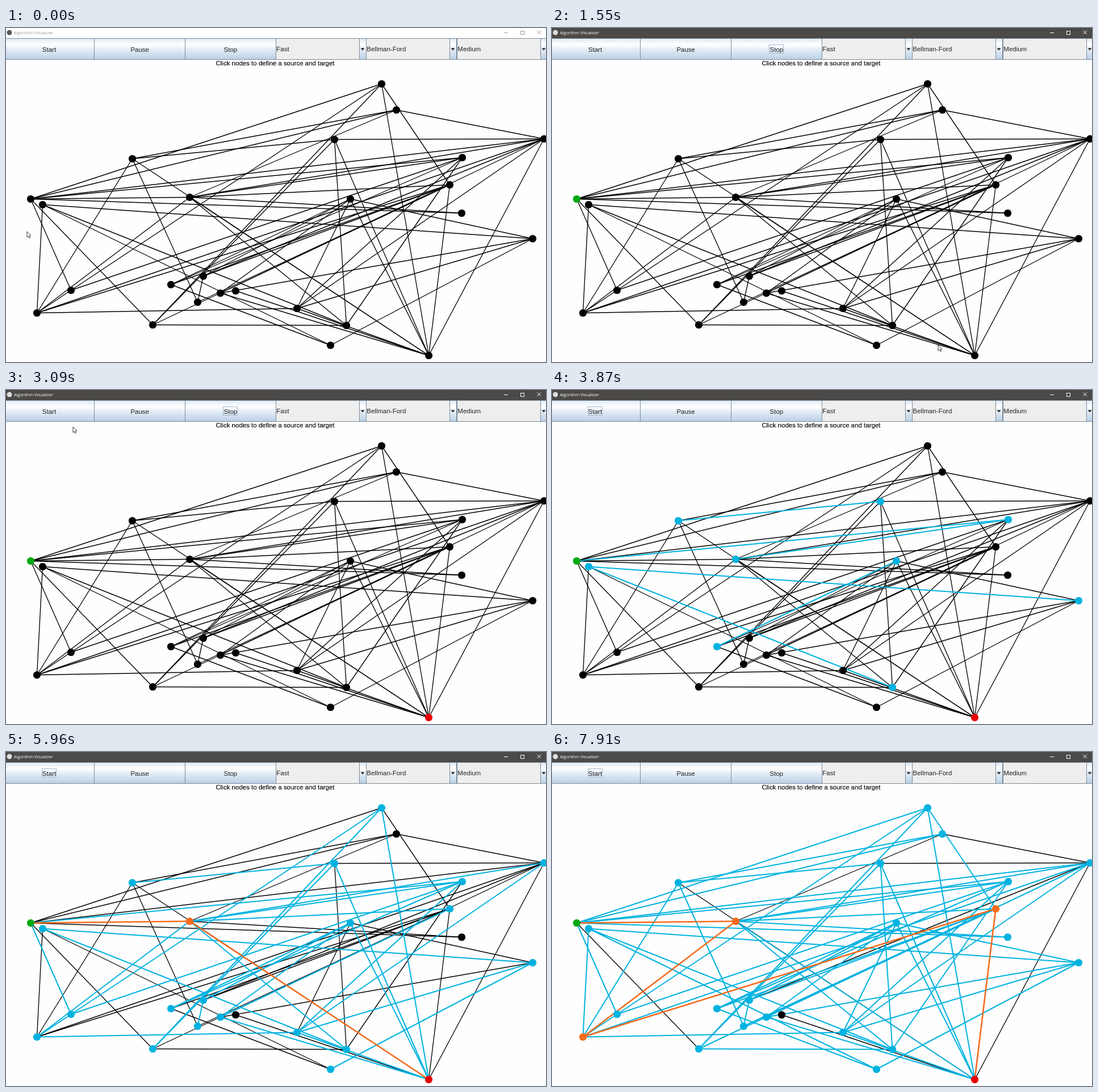
Animation of 951x589 px, one loop 7.99 s. Source, as an HTML page with a canvas:

```html
<!DOCTYPE html>
<html lang="en">
<head>
<meta charset="utf-8">
<title>Algorithm Visualizer</title>
<style>
  html, body { margin: 0; width: 100%; height: 100%; overflow: hidden; background: #fefefe; }
  canvas { display: block; }
</style>
</head>
<body>
<canvas id="stage" width="951" height="589"></canvas>
<script>
const ctx = document.getElementById('stage').getContext('2d');
const LOOP = 7990;
const ACTIVATE = 780, PICK_TARGET = 2410, PRESS = 3240, RELEASE = 3340;
const FIRST_PATH = 5360, BETTER_PATH = 6620;
const BLACK = '#000', BLUE = '#00b2e0', ORANGE = '#f76b1e', GREEN = '#00a814', RED = '#e80000';
const FONT = '11.5px "Liberation Sans", Arial, sans-serif';

const nodes = {
  a: [661, 98], b: [687, 144], c: [578, 196], d: [947, 195], e: [222, 230],
  f: [803, 228], g: [781, 276], h: [43, 301], i: [64, 311], j: [323, 298],
  k: [606, 301], l: [802, 326], m: [927, 371], n: [114, 462], o: [290, 452],
  p: [347, 437], q: [337, 483], r: [377, 467], s: [404, 463], t: [512, 494],
  u: [54, 502], v: [258, 523], w: [599, 524], x: [571, 559], y: [744, 577]
};

// Edges are node pairs, visited at even steps between start and end.
const visits = [
  [3420, 3940, 'im iw hf ec jf ok tf'],
  [4010, 4770, 'av cv cy tm ry dt ty jd pq rg jg'],
  [4830, 5580, 'hn nf hj au ay ju jw jy ky of pk'],
  [5650, 5900, 'xm ut rk'],
  [5990, 6410, 'ud eu eq ix ox vw hd'],
  [6500, 6600, 'ug gy'],
  [6850, 7290, 'jl hl bh be pg og dr'],
  [7380, 7900, 'ah ag iu km rm kt cw fw vg qg'],
  [Infinity, Infinity, 'ey jb bd cd dp dy hv sy']
];
const edges = visits.flatMap(([start, end, list]) => {
  const pairs = list.split(' ');
  return pairs.map((id, n) => ({
    id, time: start === Infinity ? start : start + (end - start) * n / (pairs.length - 1)
  }));
});

const cursorKeys = [
  [0, 37, 359], [40, 37, 359], [610, 42, 305], [ACTIVATE, 42, 305],
  [1550, 680, 559], [2260, 743, 574], [PICK_TARGET, 743, 574],
  [3090, 118, 65], [3200, 72, 39], [RELEASE, 72, 39], [3520, 30, -20]
];

function line(x1, y1, x2, y2, color, width) {
  ctx.strokeStyle = color;
  ctx.lineWidth = width;
  ctx.beginPath();
  ctx.moveTo(x1, y1);
  ctx.lineTo(x2, y2);
  ctx.stroke();
}

function polygon(points, fill) {
  ctx.beginPath();
  points.forEach(([x, y]) => ctx.lineTo(x, y));
  ctx.closePath();
  ctx.fillStyle = fill;
  ctx.fill();
}

function dot(x, y, radius, color) {
  ctx.fillStyle = color;
  ctx.beginPath();
  ctx.arc(x, y, radius, 0, Math.PI * 2);
  ctx.fill();
}

function text(label, x, y, align = 'left', color = '#222', font = FONT) {
  ctx.font = font;
  ctx.textAlign = align;
  ctx.fillStyle = color;
  ctx.fillText(label, x, y);
}

function metal(x, width) {
  const shade = ctx.createLinearGradient(0, 18, 0, 56);
  shade.addColorStop(0, '#dce8f3');
  shade.addColorStop(0.3, '#fff');
  shade.addColorStop(0.5, '#e6eef6');
  shade.addColorStop(1, '#b8cfe5');
  ctx.fillStyle = shade;
  ctx.fillRect(x, 18, width, 38);
}

function outline(x, y, width, height, color = '#7a8a99') {
  ctx.strokeStyle = color;
  ctx.lineWidth = 1;
  ctx.strokeRect(x + 0.5, y + 0.5, width, height);
}

function drawTitle(active) {
  const color = active ? '#fff' : '#999';
  ctx.fillStyle = active ? '#4c4a48' : '#fff';
  ctx.fillRect(0, 0, 951, 18);
  dot(6, 8, 4.5, active ? '#ddd' : '#555');
  text('Algorithm Visualizer', 14, 11, 'left', color, '7.43px "Open Sans", sans-serif');
  line(877, 8.5, 884, 8.5, color, 1);
  outline(906, 5, 6, 6, color);
  line(935.5, 4.5, 942, 11, color, 1);
  line(942, 4.5, 935.5, 11, color, 1);
}

function drawToolbar(time) {
  const focus = time < ACTIVATE ? '' : time < PRESS ? 'Stop' : 'Start';
  ['Start', 'Pause', 'Stop'].forEach((label, n) => {
    const x = n ? n * 160 - 5 : -4, width = n ? 160 : 159, center = 76 + n * 159.7;
    metal(x, width);
    if (label === 'Start' && time >= PRESS && time < RELEASE) {
      ctx.fillStyle = '#b8cfe5';
      ctx.fillRect(x, 18, width, 38);
    }
    outline(x, 18, width, 37);
    text(label, center, 42, 'center');
    if (label === focus) outline(Math.round(center - 13), 29, 25, 15, '#a3b8cc');
  });
  ['Fast', 'Bellman-Ford', 'Medium'].forEach((label, n) => {
    const x = Math.floor(475 + n * 159.5), arrow = x + 153;
    ctx.fillStyle = '#eee';
    ctx.fillRect(x, 18, 160, 38);
    metal(x + 147, 13);
    outline(x, 18, 159, 37);
    outline(x + 147, 18, 12, 37);
    text(label, x + 1.3, 41);
    polygon([[arrow - 3.5, 35.5], [arrow + 3.5, 35.5], [arrow, 39.5]], '#222');
  });
}

function drawGraph(time) {
  const better = time >= BETTER_PATH;
  const path = time < FIRST_PATH ? [] : better ? ['hj', 'ju', 'ug', 'gy'] : ['hj', 'jy'];
  const layers = [[BLACK, 1.35], [BLUE, 2], [ORANGE, 2.6]];
  const colors = {};
  ctx.save();
  ctx.translate(0.5, 0.5); // node positions name pixel centres
  layers.forEach(([color, width], layer) => {
    for (const { id, time: visited } of edges) {
      const rank = path.includes(id) ? 2 : time >= visited ? 1 : 0;
      if (rank !== layer) continue;
      const [from, to] = id;
      line(...nodes[from], ...nodes[to], color, width);
      colors[from] = colors[to] = color;
    }
  });
  colors.h = time >= ACTIVATE ? GREEN : BLACK;
  colors.y = time >= PICK_TARGET ? RED : BLACK;
  for (const id in nodes) dot(...nodes[id], 6.6, colors[id]);
  ctx.restore();
}

function drawCursor(time) {
  const next = cursorKeys.findIndex(key => key[0] > time);
  if (next < 1) return;
  const [t0, x0, y0] = cursorKeys[next - 1], [t1, x1, y1] = cursorKeys[next];
  const part = (time - t0) / (t1 - t0), ease = part * part * (3 - 2 * part);
  ctx.save();
  ctx.translate(x0 + (x1 - x0) * ease, y0 + (y1 - y0) * ease);
  polygon([[0, 0], [0, 10], [2.3, 8], [4, 11.5], [5.6, 10.8], [4, 7.3], [7, 7]], '#fff');
  ctx.strokeStyle = '#111';
  ctx.lineWidth = 0.8;
  ctx.stroke();
  ctx.restore();
}

function draw(time) {
  ctx.fillStyle = '#fefefe';
  ctx.fillRect(0, 0, 951, 589);
  drawGraph(time);
  drawTitle(time >= ACTIVATE);
  drawToolbar(time);
  // Drawing the message twice gives its slightly heavier weight.
  for (let n = 0; n < 2; n++) {
    text('Click nodes to define a source and target', 474, 66, 'center');
  }
  drawCursor(time);
}

const began = performance.now();
function tick() {
  draw((performance.now() - began) % LOOP);
  requestAnimationFrame(tick);
}
tick();
</script>
</body>
</html>
```
